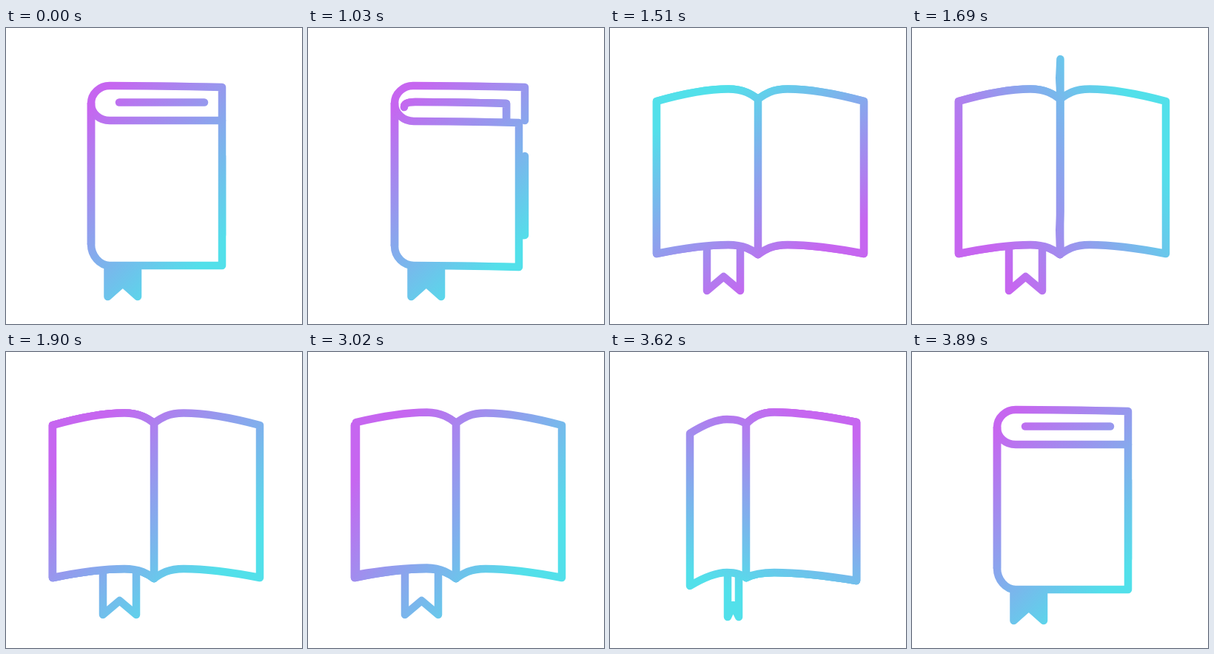
Animation of 400 by 400 pixels, one loop 3920 ms. Source, as an HTML page with a canvas:

```html
<!DOCTYPE html>
<html lang="en">
<head>
<meta charset="utf-8">
<title>Book</title>
<style>
  html, body { margin: 0; width: 100%; height: 100%; overflow: hidden; background: #fff; }
  canvas { display: block; width: 400px; height: 400px; }
</style>
</head>
<body>
<canvas id="stage"></canvas>
<script>
const LOOP = 3920, STEP = 30, STEPS = 30, OPEN_AT = 1000, CLOSE_AT = 2990;
const PURPLE = '#c666f0', CYAN = '#52e0ea';

const canvas = document.getElementById('stage');
const ctx = canvas.getContext('2d');
const ratio = window.devicePixelRatio || 1;
canvas.width = canvas.height = 400 * ratio;

// progress, spine [x, top, bottom],
// leaf [tangent x, top tangent y, bottom tangent y, peak x, top, bottom, edge x, top, bottom],
// ribbon [left, right, top, bottom, notch]
const POSES = [
  { at: 0, spine: [115, 102, 292],
    cover: [0, 14, 16, 140, 125, 321, 292, 125, 321],
    back: [0, -14, -7, 140, 78, 285, 292, 80, 280],
    ribbon: [137.5, 178, 321, 363, 345] },
  { at: 1 / 30, spine: [117, 102, 294],
    cover: [0, 14, 16, 143, 126, 321, 285, 128, 323],
    back: [0, -14, -7, 142, 78, 285, 293, 80, 280],
    ribbon: [139.5, 180, 321, 363, 345] },
  { at: .165, spine: [152, 100, 301],
    cover: [3, 6, 8, 165, 112, 318, 215, 134, 334],
    back: [4, -10, -6, 180, 79, 292, 314, 87, 297],
    ribbon: [152, 178, 310, 361, 345] },
  { at: .3, spine: [184, 97, 305],
    cover: [-7, -4, -4, 158, 91, 298, 108, 110, 316],
    back: [8, -8, -4, 222, 81.5, 298, 333, 95, 309],
    ribbon: [159, 174, 298, 358, 342] },
  { at: .367, spine: [199, 96, 306],
    cover: [-8, -6, -6, 160, 84, 294, 69, 101, 307],
    back: [10, -7, -7, 238, 81, 292, 342, 96, 306],
    ribbon: [143, 178, 297, 356, 337] },
  { at: .45, spine: [200, 96, 306],
    cover: [-8, -6, -6, 160, 82.5, 293, 63, 99, 305],
    back: [10, -7, -7, 240, 82.5, 293, 343, 99, 305],
    ribbon: [131, 176, 297, 355, 336] }
];
const TURN = [[0, 0], [.1, .02], [.2, .09], [.3, .186], [.367, .272], [.767, .8], [.9, .94], [1, 1]];

const clamp = v => Math.min(1, Math.max(0, v));
const lerp = (a, b, k) => a + (b - a) * k;
const mix = (a, b, k) => a.map((v, i) => lerp(v, b[i], k));
const ease = (p, from, to) => {
  const x = clamp((p - from) / (to - from));
  return x * x * (3 - 2 * x);
};

// Finds the two rows around a position and how far it lies between them.
function span(rows, key, pos) {
  let i = 1;
  while (i < rows.length - 1 && rows[i][key] < pos) i++;
  const a = rows[i - 1], b = rows[i];
  return [a, b, clamp((pos - a[key]) / (b[key] - a[key]))];
}

function poseAt(open) {
  const [a, b, k] = span(POSES, 'at', open);
  const pose = {};
  for (const part of ['spine', 'cover', 'back', 'ribbon']) pose[part] = mix(a[part], b[part], k);
  return pose;
}

function setGradient(open) {
  const [a, b, k] = span(TURN, 0, open);
  const angle = Math.PI / 4 + Math.PI * 2 * lerp(a[1], b[1], k);
  const dx = Math.cos(angle) * 128, dy = Math.sin(angle) * 128;
  const g = ctx.createLinearGradient(203 - dx, 200 - dy, 203 + dx, 200 + dy);
  g.addColorStop(0, PURPLE);
  g.addColorStop(1, CYAN);
  ctx.strokeStyle = g;
  return g;
}

// Control points from the spine over the peak to the outer edge.
function rim(leaf, spine, row, rise) {
  const [sx, sy] = [spine[0], spine[row]];
  const [px, py, ex, ey] = [leaf[3], leaf[3 + row], leaf[6], leaf[6 + row]];
  return [
    [sx, sy],
    [sx + leaf[0], sy + leaf[row] - 6 * rise],
    [lerp(px, sx, .52), lerp(py, sy, .5 * rise)],
    [px, py],
    [lerp(px, ex, .3), lerp(py, ey, .3 * rise)],
    [lerp(ex, px, .33), lerp(ey, py, .55)],
    [ex, ey]
  ];
}

function curve(pts) {
  for (let i = 1; i < pts.length; i += 3) {
    ctx.bezierCurveTo(...pts[i], ...pts[i + 1], ...pts[i + 2]);
  }
}

function drawLeaf(leaf, spine, { rise = 0, closed = false, gap = 0 } = {}) {
  const top = rim(leaf, spine, 1, rise), low = rim(leaf, spine, 2, rise).reverse();
  const trace = hole => {
    ctx.beginPath();
    ctx.moveTo(...top[0]);
    curve(top);
    if (hole) {
      ctx.lineTo(leaf[6], 125);
      ctx.moveTo(leaf[6], 125 + hole);
    }
    ctx.lineTo(...low[0]);
    curve(low);
    if (closed) ctx.closePath();
  };
  trace(0);
  ctx.fillStyle = '#fff';
  ctx.fill();
  trace(gap);
  ctx.stroke();
}

function drawPage(pose, turn, open) {
  const angle = Math.PI * turn;
  const rise = Math.pow(Math.max(0, Math.sin(angle)), 1.5);
  const inset = 1 - clamp((open - 1 / 30) / .15);
  const rest = pose.back.slice();
  const add = [0, 8, 0, 3, 22, 0, -25, 22, 0];
  const leaf = mix(rest.map((v, i) => v + add[i] * inset), pose.cover, (1 - Math.cos(angle)) / 2);
  leaf[4] -= 15 * rise;
  leaf[5] -= 20 * rise;
  leaf[7] -= 57 * rise;
  leaf[8] -= 57 * rise;
  const [sx, sy, sb] = pose.spine;
  drawLeaf(leaf, [sx + 13 * inset, sy + 5 * inset, sb], { rise });
}

function drawRibbon([left, right, top, bottom, notch], fill) {
  ctx.beginPath();
  ctx.moveTo(left, top);
  ctx.lineTo(left, bottom);
  ctx.lineTo((left + right) / 2, notch);
  ctx.lineTo(right, bottom);
  ctx.lineTo(right, top);
  ctx.fillStyle = fill;
  ctx.fill();
  ctx.stroke();
}

function drawLine(x1, y1, x2, y2) {
  ctx.beginPath();
  ctx.moveTo(x1, y1);
  ctx.lineTo(x2, y2);
  ctx.stroke();
}

function draw(time) {
  const t = time % LOOP;
  const progress = start => clamp(Math.floor((t - start) / STEP) / STEPS);
  const closing = t >= CLOSE_AT;
  const p = progress(closing ? CLOSE_AT : OPEN_AT);
  const open = closing ? 1 - p : p;
  const first = closing ? 1 - ease(p, .2, .63) : ease(p, .1, .58);
  const second = closing ? 1 - ease(p, -.03, .42) : ease(p, .55, .98);
  const pose = poseAt(open);
  const [sx, sy, sb] = pose.spine;

  ctx.setTransform(ratio, 0, 0, ratio, 0, 0);
  ctx.fillStyle = '#fff';
  ctx.fillRect(0, 0, 400, 400);
  ctx.lineWidth = 10.5;
  ctx.lineCap = ctx.lineJoin = 'round';
  const paint = setGradient(open);

  const pages = () => {
    if (open < .01) return drawLine(153, 100.5, 268, 100.5);
    const order = second > .5 ? [first, second] : [second, first];
    order.forEach(turn => drawPage(pose, turn, open));
  };
  const front = () => {
    drawRibbon(pose.ribbon, open < .12 ? paint : '#fff');
    drawLeaf(pose.cover, pose.spine, { closed: true });
  };

  drawLeaf(pose.back, pose.spine, { gap: 48 * (1 - clamp((open - 1 / 30) / .07)) });
  const layers = pose.cover[6] > sx ? [pages, front] : [front, pages];
  layers.forEach(layer => layer());
  drawLine(sx, sy, sx, sb);
}

const start = performance.now();
function tick() {
  draw(performance.now() - start);
  requestAnimationFrame(tick);
}
tick();
</script>
</body>
</html>
```
